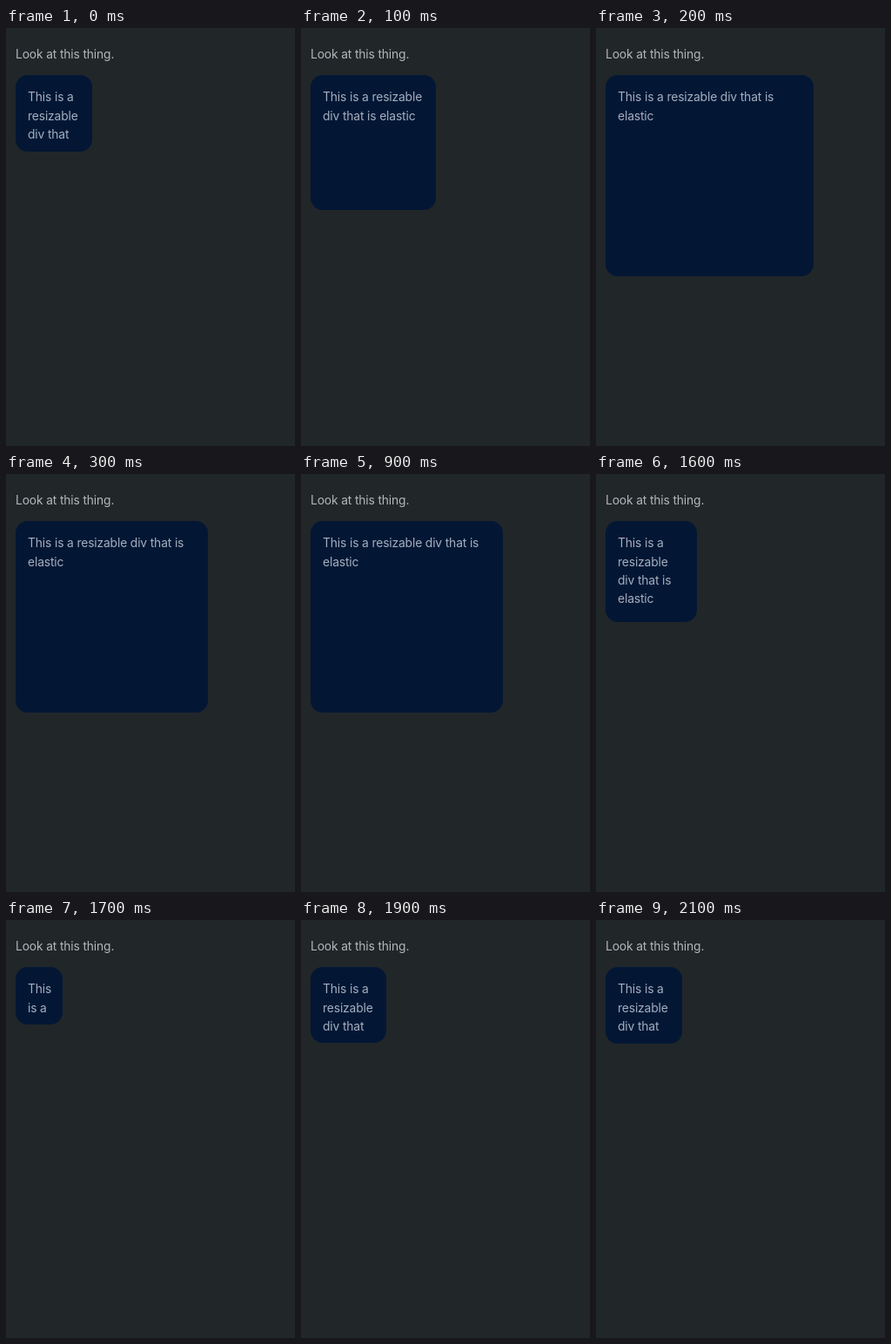
An HTML page that plays this animation: 332 by 480 pixels, repeating every 2300 ms.

```html
<!DOCTYPE html>
<html lang="en">
<head>
<meta charset="utf-8">
<title>Elastic box</title>
<style>
  html, body { margin: 0; width: 100%; height: 100%; overflow: hidden; background: #212629; }
  body {
    position: relative;
    font: 13.8px/21.3px Inter, "Open Sans", sans-serif;
    letter-spacing: -0.13px;
    color: #b3b7ba;
  }
  p { position: absolute; left: 11px; top: 20.3px; margin: 0; white-space: nowrap; }
  #box {
    position: absolute; left: 11px; top: 54px;
    box-sizing: border-box; padding: 15.3px 13px 12px 14px;
    border-radius: 14px; background: #031735; color: #a5afbe;
  }
  #text { height: 100%; overflow: hidden; }
</style>
</head>
<body>
<p>Look at this thing.</p>
<div id="box"><div id="text">This is a resizable div that is elastic</div></div>
<script>
const LOOP = 2300;
const STEP = 100; // the picture advances in hard steps
const box = document.getElementById("box");

// Each side springs open, rests, then springs shut; bounce sets the overshoot.
const width = { small: 88, large: 221, bounce: 4.1, openAt: 88.4 };
const height = { small: 88, large: 220, bounce: 3.44, openAt: 83.5 };
const OPEN_TIME = 150;
const CLOSE_AT = 1522;
const CLOSE_TIME = 400;

// Runs from 0 to 1, passing 1 on the way and settling back on it.
function elastic(time, start, duration, bounce) {
  const u = Math.min(1, Math.max(0, (time - start) / duration));
  return 1 - (1 - u) ** 2 * (1 - bounce * u);
}

function sizeAt(time, { small, large, bounce, openAt }) {
  const opened = elastic(time, openAt, OPEN_TIME, bounce);
  const closed = elastic(time, CLOSE_AT, CLOSE_TIME, bounce);
  return Math.round(small + (large - small) * (opened - closed)) + "px";
}

function draw(now) {
  const time = Math.floor((now % LOOP) / STEP) * STEP;
  box.style.width = sizeAt(time, width);
  box.style.height = sizeAt(time, height);
}

const origin = performance.now();
function tick() {
  draw(performance.now() - origin);
  requestAnimationFrame(tick);
}
tick();
</script>
</body>
</html>
```
